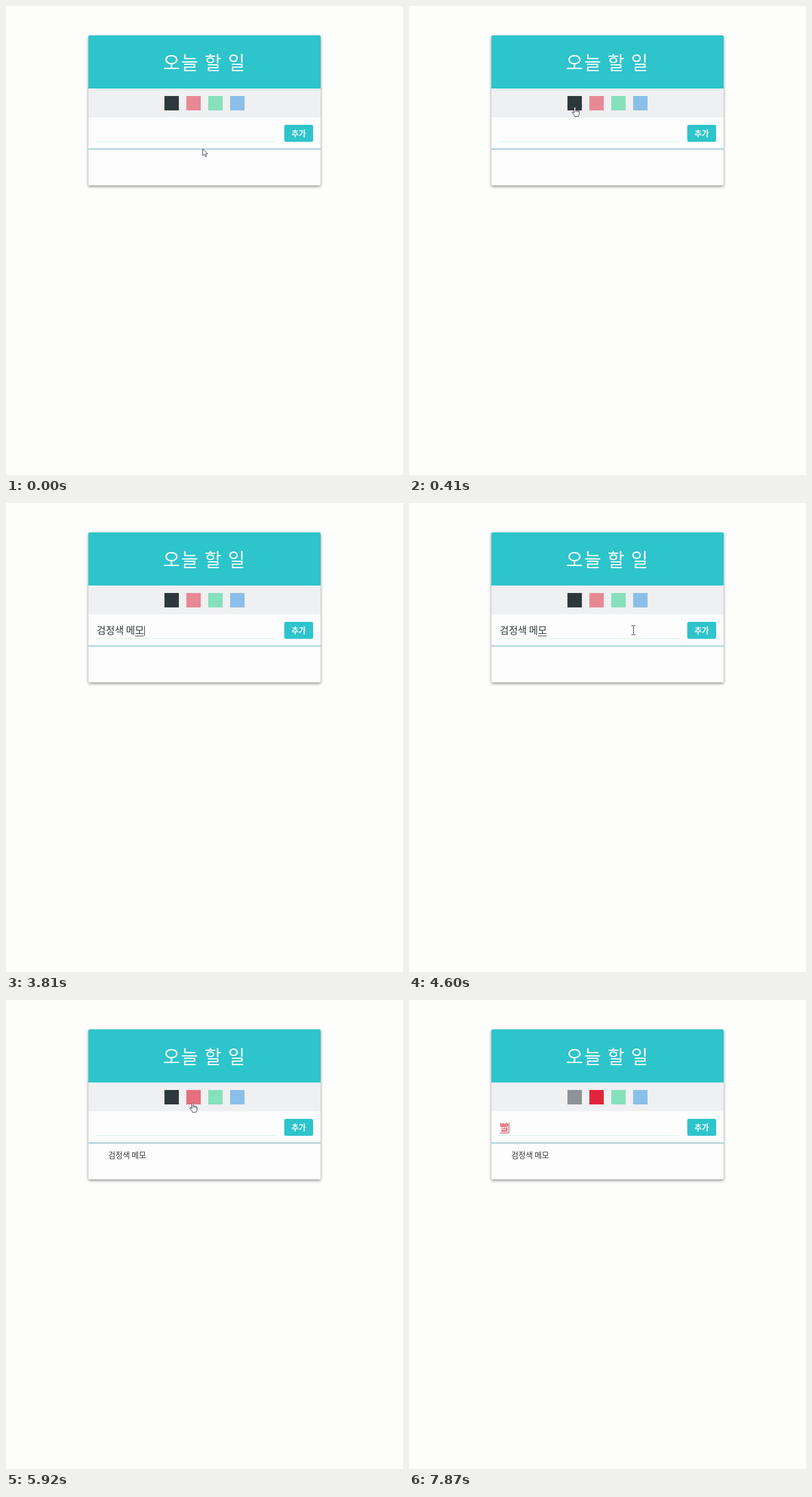
Write an HTML page with a canvas that moves like this. It is 689 px wide and 813 px high and loops after 8000 ms.

```html
<!DOCTYPE html>
<html lang="ko">
<head>
<meta charset="utf-8">
<title>오늘 할 일</title>
<style>
  html, body { margin: 0; width: 100%; height: 100%; overflow: hidden; background: #fdfdfc; }
  canvas { display: block; }
</style>
</head>
<body>
<canvas id="stage" width="689" height="813"></canvas>
<script>
const ctx = document.getElementById('stage').getContext('2d');
const LOOP = 8000;
const FAMILY = '"Noto Sans CJK KR", "Noto Sans CJK", "Noto Sans KR", sans-serif';
const TEAL = '#2dc4cb', DARK = '#2d383d', RED = '#e0253a';
const SWATCHES = [DARK, RED, '#1fd285', '#288fe2'];

// [time, text, length of the part still being composed]
const TYPING = [
  [0, '', 0],
  [2090, 'ㄱ', 1], [2530, '거', 1], [2630, '검', 1], [2730, '검ㅈ', 1],
  [2830, '검저', 1], [2930, '검정', 1], [3030, '검정새', 1], [3130, '검정색', 1],
  [3230, '검정색 ㅁ', 1], [3330, '검정색 메', 1], [3410, '검정색 멤', 1], [3810, '검정색 메모', 1],
  [4920, '', 0],
  [7430, 'ㅃ', 1], [7780, '빠', 1], [7870, '빨', 1]
];
const ADDED = 4920;
const PICK_RED = 6220;

// [start, end, x0, y0, x1, y1]
const MOVES = [
  [40, 400, 341, 247, 287, 175],
  [700, 900, 287, 175, 292, 218],
  [4370, 4840, 292, 218, 492, 222],
  [5440, 5910, 492, 222, 323, 178],
  [6270, 6760, 323, 178, 292, 218]
];
const HIDDEN = [[2090, 4340], [7430, LOOP]];
const FOCUS = [[660, 4900], [6790, LOOP]];

const clamp = v => Math.max(0, Math.min(1, v));
const ease = v => { v = clamp(v); return v * v * (3 - 2 * v); };
const easeOut = v => 1 - (1 - clamp(v)) ** 2;
const within = (spans, t) => spans.find(([a, b]) => t >= a && t < b);
const lastBefore = (list, t) => list.filter(item => item[0] <= t).pop();

function rect(x, y, w, h, color) {
  ctx.fillStyle = color;
  ctx.fillRect(x, y, w, h);
}

function text(str, x, y, size, weight, color, spacing = 0) {
  ctx.font = `${weight} ${size}px ${FAMILY}`;
  ctx.letterSpacing = spacing + 'px';
  ctx.fillStyle = color;
  ctx.fillText(str, x, y);
}

function pointer(t) {
  const [a, b, x0, y0, x1, y1] = lastBefore(MOVES, t) || MOVES[0];
  const p = ease((t - a) / (b - a));
  return { x: x0 + (x1 - x0) * p, y: y0 + (y1 - y0) * p };
}

function inBox({ x, y }, left, top, w, h) {
  return x >= left && x < left + w && y >= top && y < top + h;
}

const overButton = p => inBox(p, 483, 206, 50, 30);
const overSwatch = p => SWATCHES.some((c, i) => inBox(p, 275 + i * 38, 156, 25, 25));

function card() {
  ctx.save();
  ctx.shadowColor = 'rgba(0,0,0,.45)';
  ctx.shadowBlur = 5;
  ctx.shadowOffsetY = 2;
  ctx.fillStyle = '#fdfdfd';
  ctx.beginPath();
  ctx.roundRect(143, 51, 403, 260, 2);
  ctx.fill();
  ctx.restore();
  ctx.fillStyle = TEAL;
  ctx.beginPath();
  ctx.roundRect(143, 51, 403, 92, [2, 2, 0, 0]);
  ctx.fill();
  text('오늘 할 일', 272.5, 110, 32, 300, '#fff', 2);
  rect(143, 143, 403, 50, '#eff0f1');
  rect(155, 234.5, 315, 1.2, '#d3f8e1');
  rect(143, 247.2, 403, 1.4, '#7dbbc4');
}

function swatches(t) {
  const alpha = [
    1 - 0.5 * ease((t - PICK_RED) / 300),
    0.5 + 0.5 * easeOut((t - 5880) / 300),
    0.5, 0.5
  ];
  SWATCHES.forEach((color, i) => {
    ctx.globalAlpha = alpha[i];
    rect(275 + i * 38, 156, 25, 25, color);
  });
  ctx.globalAlpha = 1;
}

function button(hover) {
  ctx.fillStyle = hover ? '#40d2d7' : TEAL;
  ctx.beginPath();
  ctx.roundRect(483, 206, 50, 29.5, 3);
  ctx.fill();
  text('추가', 495.5, 226, 13.6, 700, '#fff');
}

function input(t) {
  const [typed, str, composing] = lastBefore(TYPING, t);
  const color = t < PICK_RED ? DARK : '#cf2439';
  text(str, 157.5, 227, 17, 300, color);
  const end = 157.5 + ctx.measureText(str).width;
  if (composing) {
    const start = 157.5 + ctx.measureText(str.slice(0, -composing)).width;
    rect(Math.round(start), 230, Math.round(end - start) - 1, 1, color);
  }
  const focus = within(FOCUS, t);
  if (!focus) return;
  const since = t - Math.max(focus[0], typed);
  if (Math.floor(since / 530) % 2 === 0) rect(Math.round(end), 213, 1, 17, color);
}

function outline(path, x, y) {
  ctx.save();
  ctx.translate(Math.round(x), Math.round(y));
  ctx.fillStyle = '#fff';
  ctx.strokeStyle = '#3b3d52';
  ctx.lineWidth = 1;
  ctx.lineJoin = 'round';
  ctx.fill(path);
  ctx.stroke(path);
  ctx.restore();
}

const ARROW = new Path2D('M.5.5V12.5L3.3 9.9 5.3 14.5 7.2 13.7 5.2 9.2H9Z');
const HAND = new Path2D(
  'M-.5 10.5V1.5Q-.5.3.7.3T2 1.5V6Q3.5 5 4.5 6.3 6 5.4 6.8 6.9 8.5 6.5 8.5 8.2V12' +
  'Q8.2 14 7 15V16.7H.8V15.3Q-1.5 13-3.7 10 -4.3 8.5-3 8.3 -1.8 8.5-.5 10.5Z' +
  'M4.5 6.3V9M6.8 7V9.3M2 6V9'
);

function cursor(p) {
  if (overButton(p) || overSwatch(p)) return outline(HAND, p.x, p.y);
  if (!inBox(p, 155, 206, 315, 29)) return outline(ARROW, p.x, p.y);
  const x = Math.round(p.x), y = Math.round(p.y);
  rect(x, y - 7, 1, 15, DARK);
  for (const edge of [y - 8, y + 8]) {
    rect(x - 3, edge, 3, 1, DARK);
    rect(x + 1, edge, 3, 1, DARK);
  }
}

function draw(t) {
  const p = pointer(t);
  rect(0, 0, 689, 813, '#fdfdfc');
  card();
  swatches(t);
  button(overButton(p));
  input(t);
  if (t >= ADDED) text('검정색 메모', 177.5, 274, 13.6, 400, '#33343a');
  if (!within(HIDDEN, t)) cursor(p);
}

const began = performance.now();
function tick() {
  draw((performance.now() - began) % LOOP);
  requestAnimationFrame(tick);
}
tick();
</script>
</body>
</html>
```
